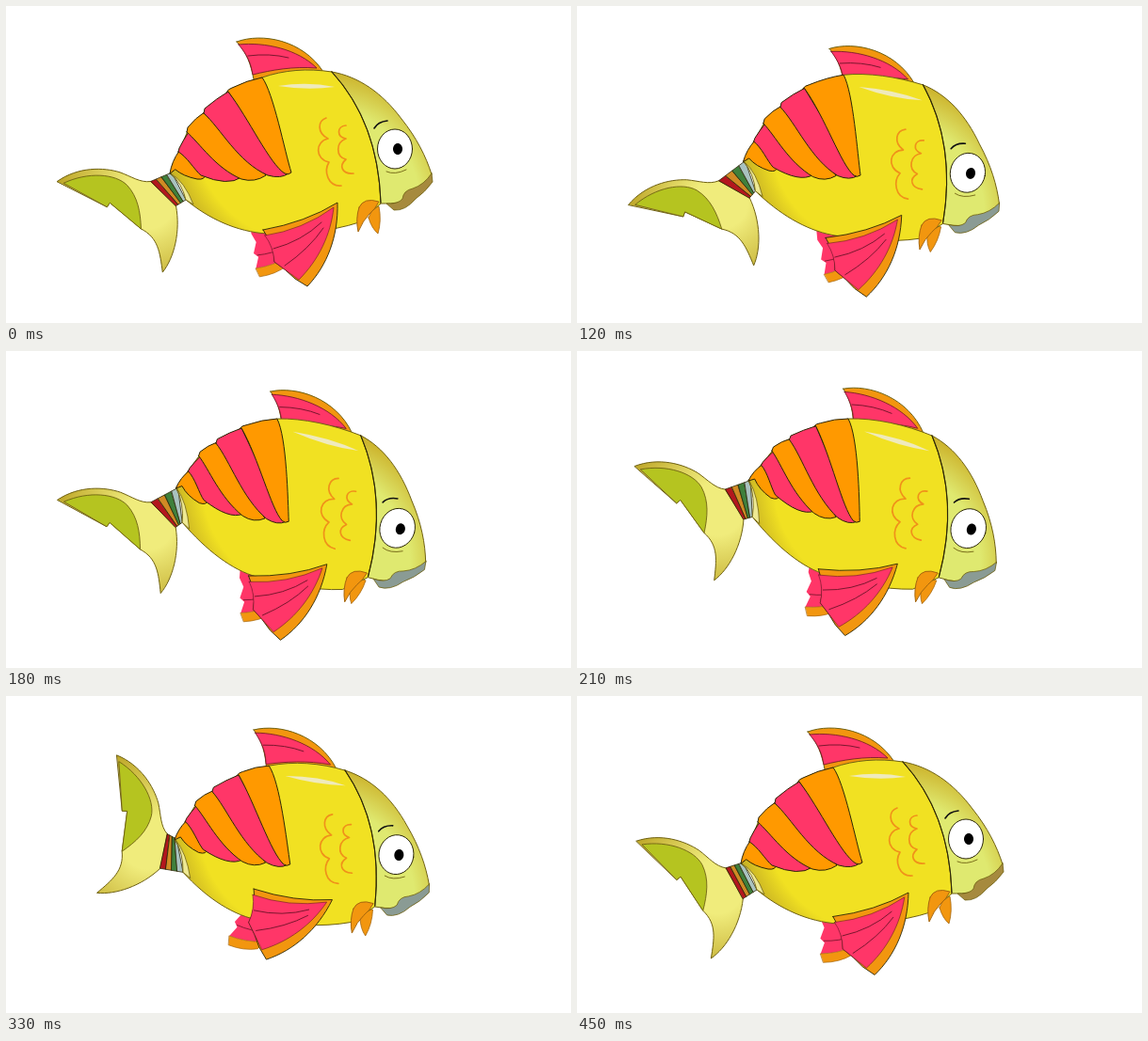
An HTML page with a canvas that plays this animation: 600 by 337 pixels, repeating every 480 ms.

```html
<!DOCTYPE html>
<html lang="en">
<head>
<meta charset="utf-8">
<title>Swimming fish</title>
<style>
html, body { margin: 0; width: 100%; height: 100%; overflow: hidden; background: #fff; }
canvas { display: block; }
</style>
</head>
<body>
<canvas id="stage" width="600" height="337"></canvas>
<script>
const ctx = document.getElementById('stage').getContext('2d');
const LOOP = 480, STEP = 30;
const YELLOW = '#f1e122', ORANGE = '#ff9900', PINK = '#ff3668', AMBER = '#f2960f';
const INK = '#2b2606', OLIVE = '#6f6112', RUST = '#a5660e', WINE = '#6a1428';

// Rises from 0 to 1, holds, and falls back; the fall may run into the next loop.
function pulse(t, riseStart, riseEnd, fallStart, fallEnd) {
  if (t < fallEnd - LOOP) t += LOOP;
  const ease = (a, b) => {
    const u = Math.min(1, Math.max(0, (t - a) / (b - a)));
    return u * u * (3 - 2 * u);
  };
  return ease(riseStart, riseEnd) - ease(fallStart, fallEnd);
}

// Moves (x, y) to a new spot and turns everything around it.
function rigid([ox, oy], [tx, ty], degrees) {
  const c = Math.cos(degrees * Math.PI / 180), s = Math.sin(degrees * Math.PI / 180);
  return (x, y) => [tx + c * (x - ox) - s * (y - oy), ty + s * (x - ox) + c * (y - oy)];
}

// Bends the body: the head end dips, the rear end lifts (rigid moving least squares).
function bend(dip, lift) {
  const pin = (x, y, dx, dy, w) => ({ x, y, X: x + dx * w, Y: y + dy * w });
  const pins = [
    pin(414, 152, 3, 37, dip), pin(346, 70, 31, 20, dip), pin(398, 207, -13, 31, dip),
    pin(302, 178, -3, 4, dip), pin(272, 76, 16, -4, dip),
    pin(234, 90, 20, -13, lift), pin(211, 183, 3, -29, lift), pin(230, 228, 0, -11, lift),
    pin(174, 178, 9, -45, lift), pin(191, 205, -5, -33, lift)
  ];
  return (x, y) => {
    for (const p of pins) p.w = 1 / ((p.x - x) ** 2 + (p.y - y) ** 2 + 0.5);
    const sum = f => pins.reduce((s, p) => s + p.w * f(p), 0);
    const total = sum(() => 1);
    const [cx, cy, CX, CY] = ['x', 'y', 'X', 'Y'].map(k => sum(p => p[k]) / total);
    const dot = sum(p => (p.x - cx) * (p.X - CX) + (p.y - cy) * (p.Y - CY));
    const cross = sum(p => (p.x - cx) * (p.Y - CY) - (p.y - cy) * (p.X - CX));
    return rigid([cx, cy], [CX, CY], Math.atan2(cross, dot) * 180 / Math.PI)(x, y);
  };
}

function paint(warp, d, fill, stroke, width = 1) {
  const path = new Path2D(d.replace(/([\d.]+),([\d.]+)/g, (_, x, y) => warp(+x, +y).join()));
  if (fill) { ctx.fillStyle = fill; ctx.fill(path); }
  if (stroke) { ctx.strokeStyle = stroke; ctx.lineWidth = width; ctx.stroke(path); }
}

function oval(x, y, rx, ry) {
  const a = rx * 0.552, b = ry * 0.552;
  return `M${x + rx},${y} C${x + rx},${y + b} ${x + a},${y + ry} ${x},${y + ry}
    C${x - a},${y + ry} ${x - rx},${y + b} ${x - rx},${y} C${x - rx},${y - b} ${x - a},${y - ry} ${x},${y - ry}
    C${x + a},${y - ry} ${x + rx},${y - b} ${x + rx},${y}Z`;
}

function glow([x, y], radius, inner, outer, start) {
  const g = ctx.createRadialGradient(x, y, 0, x, y, radius);
  g.addColorStop(start, inner);
  g.addColorStop(1, outer);
  return g;
}

function drawFarFin(fin) {
  paint(fin, 'M260,226 L260,241 L265,250 L262,262 L267,266 L264,278 Q282,276 300,266 L306,226Z', PINK);
  paint(fin, 'M264,278 Q282,276 300,266 L297,276 Q285,285 268,287Z', AMBER, RUST, 0.7);
  paint(fin, 'M266,264 Q282,263 296,256', null, WINE, 0.8);
}

function drawDorsal(fin) {
  paint(fin, 'M245,38 C272,28 315,36 337,70 L336,76 L263,78 C260,62 256,50 245,38Z', AMBER, OLIVE);
  paint(fin, 'M247,41 C275,38 310,46 330,66 C305,64 282,68 262,73 C260,60 256,52 247,41Z', PINK, WINE, 0.8);
  paint(fin, 'M257,53 Q280,50 300,55', null, WINE, 0.9);
}

function drawTail(tail, body) {
  paint(tail, `M55,182 C78,167 105,169 122,175 C134,180 143,187 154,186 L180,213
    C184,240 176,268 163,283 C161,262 160,246 142,236 L110,207 L107,211Z`,
    glow(tail(150, 208), 95, '#f0ec7c', '#c0a92c', 0.3), OLIVE);
  paint(tail, 'M62,184 C88,173 117,176 129,189 C140,202 142,218 142,236 L110,207 L107,211Z', '#b5c420', OLIVE, 0.9);

  // Coloured rings fill the gap between tail and body.
  const top = [tail(154, 186), body(176, 177)], bottom = [tail(180, 213), body(191, 206)];
  const along = ([a, b], u) => a.map((v, k) => v + (b[k] - v) * u);
  ['#b3171e', '#d08a24', '#3f803c', '#a9c2c0'].forEach((color, i) => {
    const from = i / 4, to = (i + 1) / 4;
    ctx.beginPath();
    for (const p of [along(top, from), along(top, to), along(bottom, to), along(bottom, from)]) ctx.lineTo(...p);
    ctx.closePath();
    ctx.fillStyle = color;
    ctx.fill();
    ctx.strokeStyle = INK;
    ctx.lineWidth = 0.8;
    ctx.stroke();
  });
}

function drawBody(body) {
  paint(body, `M346,70 C320,66 295,68 272,76 L236,92 L211,113 L192,135 L174,178 Q188,188 191,206
    C215,226 245,240 277,242 C305,243 345,240 375,230 L398,210 C396,150 378,105 346,70Z`,
    glow(body(320, 130), 155, YELLOW, '#c2ab24', 0.78), OLIVE);
  paint(body, 'M175,178 Q190,187 199,211 L191,206 Q187,189 175,178Z', '#eee993', OLIVE, 0.8);

  const stripes = [
    'M174,178 Q176,165 184,154 L211,179 Q212,185 203,184 Q188,181 180,174Z',
    'M183,155 L184,151 Q188,143 194,134 L250,182 Q236,192 207,180 C200,174 192,160 183,155Z',
    'M192,134 L193,129 Q201,119 212,112 L276,180 Q264,188 250,184 C222,172 206,146 192,134Z',
    'M210,114 L211,109 Q224,98 236,91 L300,178 Q292,184 278,180 C246,166 228,130 210,114Z',
    'M234,92 Q236,88 240,87 Q256,79 272,76 C284,92 296,155 303,177 Q300,180 296,178 C280,168 258,120 236,91Z'
  ];
  stripes.forEach((d, i) => paint(body, d, i % 2 ? PINK : ORANGE, INK));

  paint(body, `M340,119 C331,122 330,135 342,141 C328,144 328,163 343,166 C337,176 342,192 356,191
    M361,127 C351,128 351,139 361,141 C350,145 350,160 361,163 C353,170 357,179 369,178`, null, '#f0911a', 1.7);
  paint(body, 'M289,85 Q320,80 349,86 Q320,90 289,85Z', '#efeabc');
}

function drawHead(body, lips) {
  paint(body, `M346,70 C375,75 400,93 420,120 C436,140 446,160 452,179 Q446,197 432,203
    Q420,211 398,210 C396,150 378,105 346,70Z`, glow(body(340, 210), 138, '#dfe970', '#cdb52e', 0.72), OLIVE);
  paint(body, 'M398,209 C396,150 378,105 346,70', null, INK, 1.1);
  paint(body, `M452,178 L453,187 Q445,198 435,205 Q424,218 412,217 L404,210 Q416,211 421,205
    Q422,196 432,194 Q444,190 452,178Z`, lips, OLIVE, 0.8);

  paint(body, oval(413, 152, 18.5, 21), '#fff', INK);
  paint(body, oval(416, 152, 5, 6), '#000');
  paint(body, 'M391,130 Q395,123 405,122', null, '#111', 1.6);
  paint(body, 'M404,176 Q413,180 425,174', null, OLIVE, 0.9);
}

function drawNearFin(fin) {
  paint(fin, `M273,238 Q318,230 352,209 C353,245 341,276 320,298 L307,290 Q297,280 285,272
    Q285,255 273,238Z`, AMBER, INK, 0.9);
  paint(fin, 'M275,244 Q315,238 348,214 C345,243 332,270 311,291 L285,272 Q284,256 275,244Z', PINK, WINE, 0.6);
  paint(fin, 'M284,258 Q314,250 335,230 M296,276 Q322,258 337,236', null, WINE, 0.9);
}

function drawFish(t) {
  const dip = pulse(t, 0, 190, 245, 405), lift = pulse(t, 50, 250, 250, 425);
  const body = bend(dip, lift);
  const onBody = (x, y, degrees) => rigid([x, y], body(x, y), degrees);
  const tailY = 200 - 47 * pulse(t, 85, 265, 265, 460);
  const tail = rigid([167, 200], [167, tailY], 74 * pulse(t, 105, 345, 350, 535) - 18);

  drawFarFin(onBody(300, 225, 34 * pulse(t, 100, 320, 345, 520) - 6));
  paint(onBody(393, 216, 30 * dip), 'M385,225 Q390,213 396,213 Q399,228 395,242 Q388,236 385,225Z', AMBER, RUST, 0.8);
  drawDorsal(onBody(337, 70, 11 * lift));
  drawTail(tail, body);
  drawBody(body);
  drawHead(body, t < 60 || t >= 450 ? '#a68a3e' : '#8a9b94');
  paint(onBody(386, 208, 3 * dip), 'M375,214 Q380,203 396,208 Q392,216 386,221 Q379,228 374,240 Q371,226 375,214Z', AMBER, RUST);
  drawNearFin(onBody(352, 209, 28 * pulse(t, 60, 330, 340, 475)));
}

let start;
function tick(now) {
  start ??= now;
  ctx.fillStyle = '#fff';
  ctx.fillRect(0, 0, 600, 337);
  ctx.lineJoin = ctx.lineCap = 'round';
  drawFish(Math.floor((now - start) % LOOP / STEP) * STEP);
  requestAnimationFrame(tick);
}
requestAnimationFrame(tick);
</script>
</body>
</html>
```
